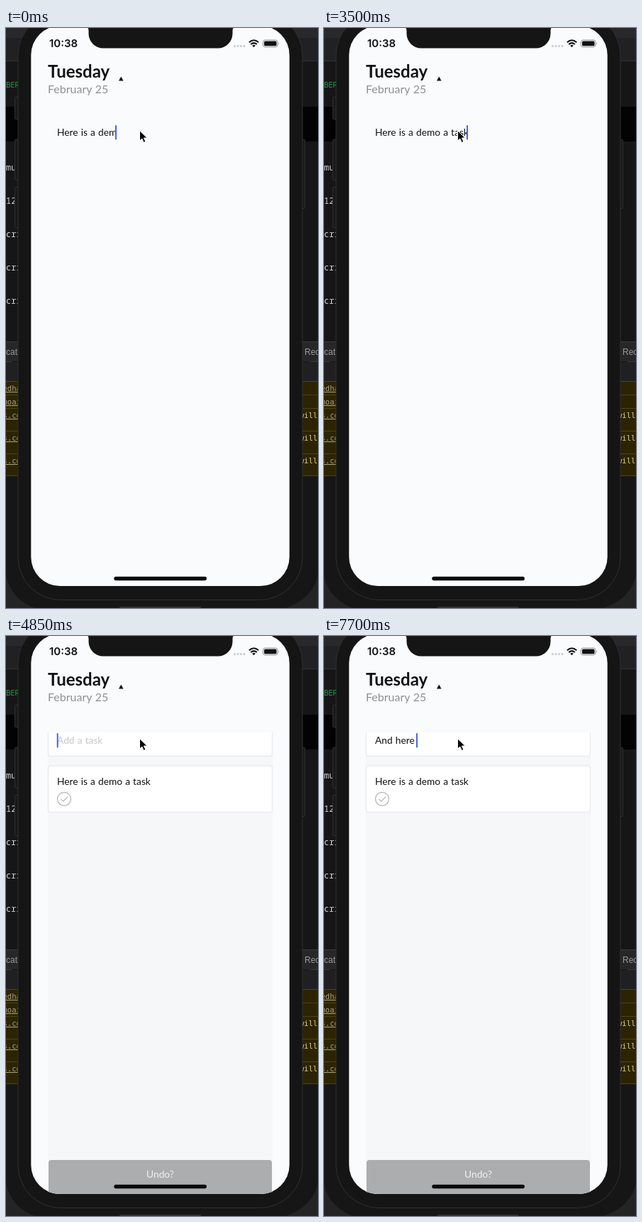
An HTML page that plays this animation: 440x818 px, repeating every 8 s.

```html
<!DOCTYPE html>
<html lang="en">
<head>
<meta charset="utf-8">
<title>Task list</title>
<style>
  html, body { margin: 0; width: 100%; height: 100%; overflow: hidden; background: #171717; }
  svg { display: block; width: 440px; height: 818px; }
  text { white-space: pre; }
  .app { font: 13.75px Lato, sans-serif; word-spacing: .6px; fill: #111; }
  .code { font: 12px "Noto Sans Mono", monospace; fill: #cfcfcf; }
  .log { font: 10.5px "DejaVu Sans Mono", monospace; fill: #a8a083; text-decoration: underline; }
  .warn { font: 10.5px "DejaVu Sans Mono", monospace; fill: #dccb94; }
  .tab { font: 12px "Liberation Sans", Arial, sans-serif; fill: #999; }
  .card { fill: #fff; stroke: #e9ebee; stroke-width: 1.5; }
  .button { fill: #191919; stroke: #303030; }
</style>
</head>
<body>
<svg viewBox="0 0 440 818">
  <defs>
    <clipPath id="screen"><rect x="35.300" y="-3" width="364.400" height="790" rx="41"/></clipPath>
    <clipPath id="list"><rect x="58" y="136" width="319" height="651"/></clipPath>
  </defs>

  <!-- Desktop behind the phone -->
  <g id="desktop">
    <rect width="440" height="818" fill="#161616"/>
    <rect width="440" height="14" fill="#29292c"/>
    <rect y="14" width="440" height="32" fill="#202125"/>
    <rect y="46" width="440" height="1" fill="#303034"/>
    <rect y="111" width="440" height="49" fill="#030303"/>
    <rect y="442" width="440" height="28" fill="#272727"/>
    <path d="M0 442.5H440M0 470.5H8M428 470.5H440" stroke="#3a3a3a"/>
    <rect y="471" width="440" height="27" fill="#202022"/>
    <rect y="498" width="440" height="133" fill="#2c2400"/>
    <path d="M0 498.5H440M0 517.5H440M0 536.5H440M0 568.5H440M0 600.5H440M0 631.5H440" stroke="#51430c"/>
    <path d="M0 772V818H40Q6 804 0 772ZM440 772V818H395Q433 804 440 772Z" fill="#242424"/>
    <text x="0" y="84" font-family="Inter, sans-serif" font-size="10" fill="#21a24b">BER</text>
    <text class="tab" x="0" y="461">cat</text>
    <text class="tab" x="421" y="461">Rec</text>
  </g>

  <!-- Phone body -->
  <rect class="button" x="12.500" y="97.500" width="8" height="31" rx="1"/>
  <rect class="button" x="12.500" y="157.500" width="8" height="57" rx="1"/>
  <rect class="button" x="12.500" y="224.500" width="8" height="57" rx="1"/>
  <rect class="button" x="413.500" y="157.500" width="8" height="97" rx="1"/>
  <rect x="17" y="-21.500" width="401" height="828" rx="60" fill="#151515" stroke="#303030"/>
  <rect x="160" y="816" width="115" height="3" rx="1" fill="#303030"/>

  <g clip-path="url(#screen)">
    <rect x="35" y="-3" width="365" height="790" fill="#f9fbfd"/>
    <path d="M110 -3A6.500 6.500 0 0 1 116.500 3.500V8A20.500 20.500 0 0 0 137 28.500H299A20.500 20.500 0 0 0 319.500 8V3.500A6.500 6.500 0 0 1 326 -3Z" fill="#151515"/>

    <!-- Status bar -->
    <text x="61" y="27" font-family="Inter, sans-serif" font-size="15" font-weight="600" fill="#111">10:38</text>
    <path d="M322.500 25.500h14" stroke="#c9cbcd" stroke-width="3.200" stroke-linecap="round" stroke-dasharray="0 4.500"/>
    <path d="M342.800 20.300Q349.500 14.200 356.200 20.300M345.200 23Q349.500 19.200 353.800 23" fill="none" stroke="#111" stroke-width="2"/>
    <path d="M347.200 24.700Q349.500 22.900 351.800 24.700L349.500 27.200Z" fill="#111"/>
    <rect x="362.500" y="17" width="20.500" height="9.800" rx="2.800" fill="none" stroke="#8f9092"/>
    <rect x="364" y="18.500" width="17.500" height="6.800" rx="1.500" fill="#111"/>
    <path d="M384.400 20.200Q386.200 21.900 384.400 23.600Z" fill="#8f9092"/>

    <!-- Heading -->
    <text class="app" x="59" y="70" style="font-size:24px;font-weight:700">Tuesday</text>
    <text class="app" x="59" y="92" style="font-size:16px;fill:#8e9092">February 25</text>
    <path d="M162.300 68.500L165.500 74.500H159Z" fill="#111"/>

    <!-- Task list -->
    <g id="tasks" clip-path="url(#list)">
      <rect x="59" y="136" width="317" height="651" fill="#f6f7f9"/>
      <rect class="card" x="59.500" y="110" width="316" height="59.500" rx="3"/>
      <rect class="card" x="59.500" y="183" width="316" height="65.500" rx="3"/>
      <text class="app" x="72" y="209.500">Here is a demo a task</text>
      <g fill="none" stroke="#b4b4b4" stroke-width="1.200">
        <circle cx="82" cy="229.800" r="9.500"/>
        <path d="M77.500 230L80.800 233.200L86.800 226.800"/>
      </g>
      <g id="toast">
        <rect x="-157.500" y="-35" width="315" height="70" rx="4" fill="#acadaf"/>
        <text class="app" y="-10.500" text-anchor="middle" style="fill:#f1f1f1">Undo?</text>
      </g>
    </g>

    <text id="entry" class="app" x="72" y="152"></text>
    <rect id="caret" y="137" width="2" height="20.500" rx=".8" fill="#4767dd"/>
    <rect x="152.300" y="773.800" width="130.600" height="5.400" rx="2.700" fill="#080808"/>
  </g>

  <path d="M188.500 144.800V159.200L191.800 156.100L194.200 161.500L196.900 160.300L194.500 155.100H199Z" fill="#080808" stroke="#fff" stroke-width="1"/>
</svg>

<script>
const byId = id => document.getElementById(id);
const LOOP = 8000, SUBMIT = 3950;

function addText(cls, x, y, content) {
  const node = document.createElementNS("http://www.w3.org/2000/svg", "text");
  node.setAttribute("class", cls);
  node.setAttribute("x", x);
  node.setAttribute("y", y);
  node.textContent = content;
  byId("desktop").append(node);
}
["mu", "12", "cri", "cri", "cri"].forEach((s, i) => addText("code", 0, 201 + 47 * i, s));
addText("log", -4.5, 512, "edha");
addText("log", -4.5, 531, "moai");
for (let i = 0; i < 3; i++) {
  addText("log", -4.5, 550 + 32 * i, "s.co");
  addText("warn", 414, 550 + 32 * i, "will");
}

// Time, typed text, caret x
const typing = [
  [0, "Here is a dem", 154],
  [150, "Here is a demo", 161.5],
  [500, "Here is a demo ", 165.5],
  [800, "Here is a demo a", 172.8],
  [1100, "Here is a demo a ", 176.6],
  [1250, "Here is a demo a t", 181],
  [1550, "Here is a demo a ta", 188],
  [1700, "Here is a demo a task", 201],
  [1850, "Here is a demo a task ", 204.5],
  [3500, "Here is a demo a task", 201],
  [SUBMIT, "", 71.7],
  [6800, "An", 88.5],
  [6950, "And", 96.3],
  [7250, "And ", 100],
  [7400, "And he", 115],
  [7550, "And here", 126.5],
  [7700, "And here ", 130]
];

// Time, caret opacity
const blink = [
  [0, 1], [2450, .45], [2600, 0], [2900, .5], [3050, 1],
  [SUBMIT, 0], [4100, 1], [4400, .45], [4550, 0], [4850, 1],
  [5300, .45], [5450, 0], [5900, 1], [6350, .45], [6500, 0], [6800, 1]
];

// Time, toast scale
const grow = [[0, .505], [4100, .87], [4250, .975], [4400, 1]];

const at = (steps, t) => steps.findLast(step => step[0] <= t);

function draw(now) {
  const t = now % LOOP;
  const [, text, x] = at(typing, t);
  const scale = at(grow, t)[1];
  const entry = byId("entry"), caret = byId("caret");
  entry.textContent = text || "Add a task";
  entry.style.fill = text ? "#111" : "#c5c7c9";
  caret.setAttribute("x", x);
  caret.setAttribute("opacity", at(blink, t)[1]);
  byId("tasks").style.visibility = t < SUBMIT ? "hidden" : "visible";
  const y = 774 - 12.5 * (1 - scale);
  byId("toast").setAttribute("transform", `translate(217.5 ${y}) scale(${scale})`);
}

const start = performance.now();
function tick() {
  draw(performance.now() - start);
  requestAnimationFrame(tick);
}
tick();
</script>
</body>
</html>
```
